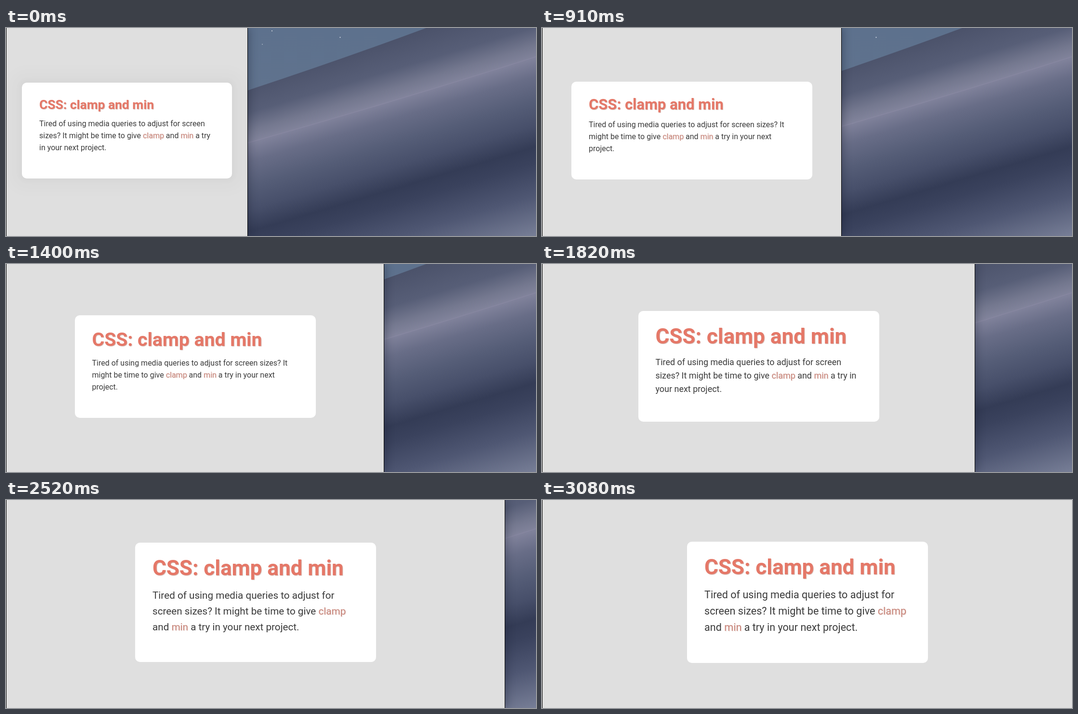
These frames come from a looping animation (1100x434 px, 3.15 s). An HTML page:

```html
<!DOCTYPE html>
<html lang="en">
<head>
<meta charset="utf-8">
<title>CSS: clamp and min</title>
<style>
  html, body { margin: 0; width: 100%; height: 100%; overflow: hidden; }
  #stage { position: relative; width: 1100px; height: 434px; overflow: hidden; }
  svg { position: absolute; inset: 0; }

  #panel {
    position: absolute; left: 0; top: 0;
    width: var(--w); height: 427.6px; padding-bottom: 6.4px;
    display: flex; align-items: center; justify-content: center;
    background: #dfdfdf; border: solid #000; border-width: 0 1px;
    box-shadow: 3px 0 16px rgba(20, 26, 44, .35);
    font-family: Roboto, sans-serif; color: #3b3b3b;
  }
  #card {
    box-sizing: border-box; padding: 36px;
    width: min(500px, var(--w) - 64px);
    background: #fff; border-radius: 10px;
    box-shadow: 0 0 8px 6px rgba(0, 0, 0, calc(.02 * var(--glow))),
                0 0 30px 25px rgba(0, 0, 0, calc(.02 * var(--glow)));
  }
  h1 {
    margin: 0 0 .5em; line-height: .8; white-space: nowrap; font-weight: 700;
    font-size: clamp(1.65rem, var(--w) * .05, 2.75rem);
    color: #e57868; text-shadow: 1px 1px 1px #d3b9b3;
  }
  p {
    margin: 1em 0; line-height: var(--line);
    font-size: clamp(1rem, var(--w) * .02, 1.35rem);
  }
  em { font-style: normal; color: #c9857a; text-shadow: 1px 1px 1px #e6d6d2; }
</style>
</head>
<body>
<div id="stage">
  <svg width="1100" height="434">
    <defs>
      <linearGradient id="sky" x2="0" y2="1">
        <stop stop-color="#5d718d"/><stop offset="1" stop-color="#66768f"/>
      </linearGradient>
      <!-- both dune gradients run at right angles to the ridge -->
      <linearGradient id="far" gradientUnits="userSpaceOnUse" x1="800" y1="153" x2="764" y2="33">
        <stop stop-color="#82849c"/><stop offset=".2" stop-color="#74788f"/>
        <stop offset=".5" stop-color="#575e77"/><stop offset="1" stop-color="#4b526a"/>
      </linearGradient>
      <linearGradient id="near" gradientUnits="userSpaceOnUse" x1="800" y1="153" x2="903" y2="498">
        <stop stop-color="#7f819a"/><stop offset=".1" stop-color="#686d87"/>
        <stop offset=".24" stop-color="#555d77"/><stop offset=".37" stop-color="#474f6a"/>
        <stop offset=".49" stop-color="#343c56"/><stop offset=".58" stop-color="#3a425d"/>
        <stop offset=".76" stop-color="#4f5773"/><stop offset="1" stop-color="#7a8199"/>
      </linearGradient>
    </defs>
    <rect width="1100" height="434" fill="url(#sky)"/>
    <g fill="#dfe3ea">
      <circle cx="552" cy="6" r="1"/><circle cx="532" cy="34" r=".8"/><circle cx="693.5" cy="19.5" r="1.1"/>
    </g>
    <path d="M490 134Q690 68 872 0H1100V434H490Z" fill="url(#far)"/>
    <path d="M490 243Q800 156 1100 60V434H490Z" fill="url(#near)"/>
    <path d="M490 243Q800 156 1100 60" fill="none" stroke="#8c8aa5" stroke-width="1.5" opacity=".6"/>
  </svg>
  <div id="panel">
    <div id="card">
      <h1>CSS: clamp and min</h1>
      <p>Tired of using media queries to adjust for screen sizes? It might be time to give
        <em>clamp</em> and <em>min</em> a try in your next project.</p>
    </div>
  </div>
</div>
<script>
  const LOOP = 3150, STEP = 70;
  // [time in ms, panel width]: the divider is dragged by hand
  const drag = [[0, 500], [560, 563], [910, 620], [1120, 704], [1400, 783], [1680, 884],
    [1820, 897], [2170, 1002], [2240, 1005], [2520, 1034], [2800, 1069], [3080, 1100]];
  const panel = document.getElementById('panel');
  const clamp = (lo, v, hi) => Math.min(hi, Math.max(lo, v));

  function widthAt(t) {
    const i = drag.findIndex(k => k[0] >= t);
    if (i < 1) return drag[0][1];
    const [t0, w0] = drag[i - 1], [t1, w1] = drag[i];
    return Math.round(w0 + (w1 - w0) * (t - t0) / (t1 - t0));
  }

  function draw(now) {
    const t = Math.floor(now % LOOP / STEP) * STEP;
    const w = widthAt(t);
    const line = Math.floor(1.6 * clamp(16, w * .02, 21.6));
    panel.style.setProperty('--w', w + 'px');
    panel.style.setProperty('--line', line + 'px');
    panel.style.setProperty('--glow', clamp(0, 1 - t / 900, 1));
  }

  const start = performance.now();
  function tick() {
    draw(performance.now() - start);
    requestAnimationFrame(tick);
  }
  tick();
</script>
</body>
</html>
```
